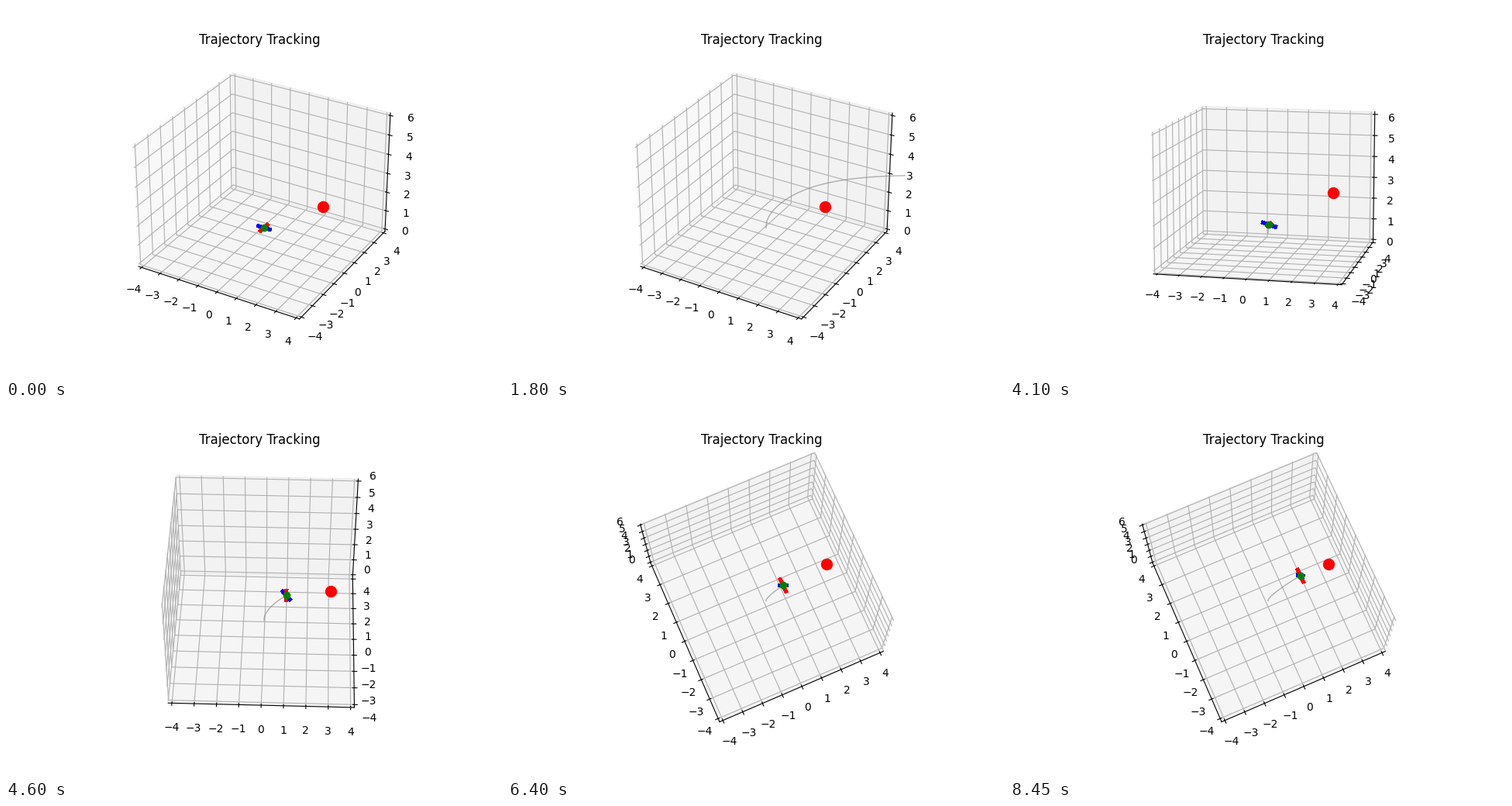
A matplotlib script that plays this animation: 640 px wide and 480 px high, repeating every 8500 ms.

```python
import numpy as np
import matplotlib.pyplot as plt
from matplotlib.animation import FuncAnimation

plt.rcParams["axes3d.automargin"] = True

FRAMES, STEP = 170, 50      # frame count, ms per frame
RUN = 37                    # frames in one flight
ARM = 0.3                   # half length of a rotor arm
GOAL = (3, 0, 3)

# Mouse drag of the camera: seconds, elevation, azimuth
DRAG = [(3.25, 30, -60), (3.35, 28.5, -60), (4.1, 11, -77),
        (4.5, 28, -84), (4.6, 45.1, -88.2), (5.45, 75.3, -113.6)]


def camera(t):
    times, elev, azim = zip(*DRAG)
    return np.interp(t, times, elev), np.interp(t, times, azim)


def flight(t, run):
    """Positions at times t; the path lies in the y = 0 plane."""
    x = 1.395 * t ** 2.9 * (1 - np.exp(-(t / .45) ** 2))
    z = 1 + 3.3 * np.sin(np.pi / 2 * t / 1.78) ** 2
    if run == 0:            # the first flight overshoots upwards
        z = z + .155 * t ** 4
    return np.array([x, 0 * t, z])


def pitch(t):
    bump = np.exp(-((t - 1.13) / .62) ** 2)
    return np.radians(66) * bump * (1 - np.exp(-(t / .2) ** 2))


fig = plt.figure(figsize=(6.4, 4.8), dpi=100)
ax = fig.add_subplot(projection="3d")
ax.set_title("Trajectory Tracking", x=.498)
ax.set(xlim=(-4, 4), ylim=(-4, 4), zlim=(0, 6),
       xticks=range(-4, 5), yticks=range(-4, 5), zticks=range(7))

ax.plot(*[[c] for c in GOAL], "o", color="red", markersize=10)
trail, = ax.plot([], [], [], color="gray", alpha=.6, lw=1)
arm_x, = ax.plot([], [], [], color="blue", lw=3, antialiased=False)
arm_y, = ax.plot([], [], [], color="red", lw=3, antialiased=False)
hub, = ax.plot([], [], [], "o", color="green", markersize=6, antialiased=False)


def set_arm(line, pos, direction):
    reach = ARM * np.array(direction)
    line.set_data_3d(*np.transpose([pos - reach, pos + reach]))


def update(frame):
    run, k = divmod(frame, RUN)
    t = np.arange(k + 1) * STEP / 1000
    path = flight(t, run)
    pos, tilt = path[:, -1], pitch(t[-1])

    trail.set_data_3d(*path)
    set_arm(arm_x, pos, (np.cos(tilt), 0, -np.sin(tilt)))
    set_arm(arm_y, pos, (0, 1, 0))
    hub.set_data_3d(*pos[:, None])
    ax.view_init(*camera(frame * STEP / 1000))
    return trail, arm_x, arm_y, hub


anim = FuncAnimation(fig, update, frames=FRAMES, interval=STEP,
                     repeat=True, repeat_delay=0, blit=False)
plt.show()
```
